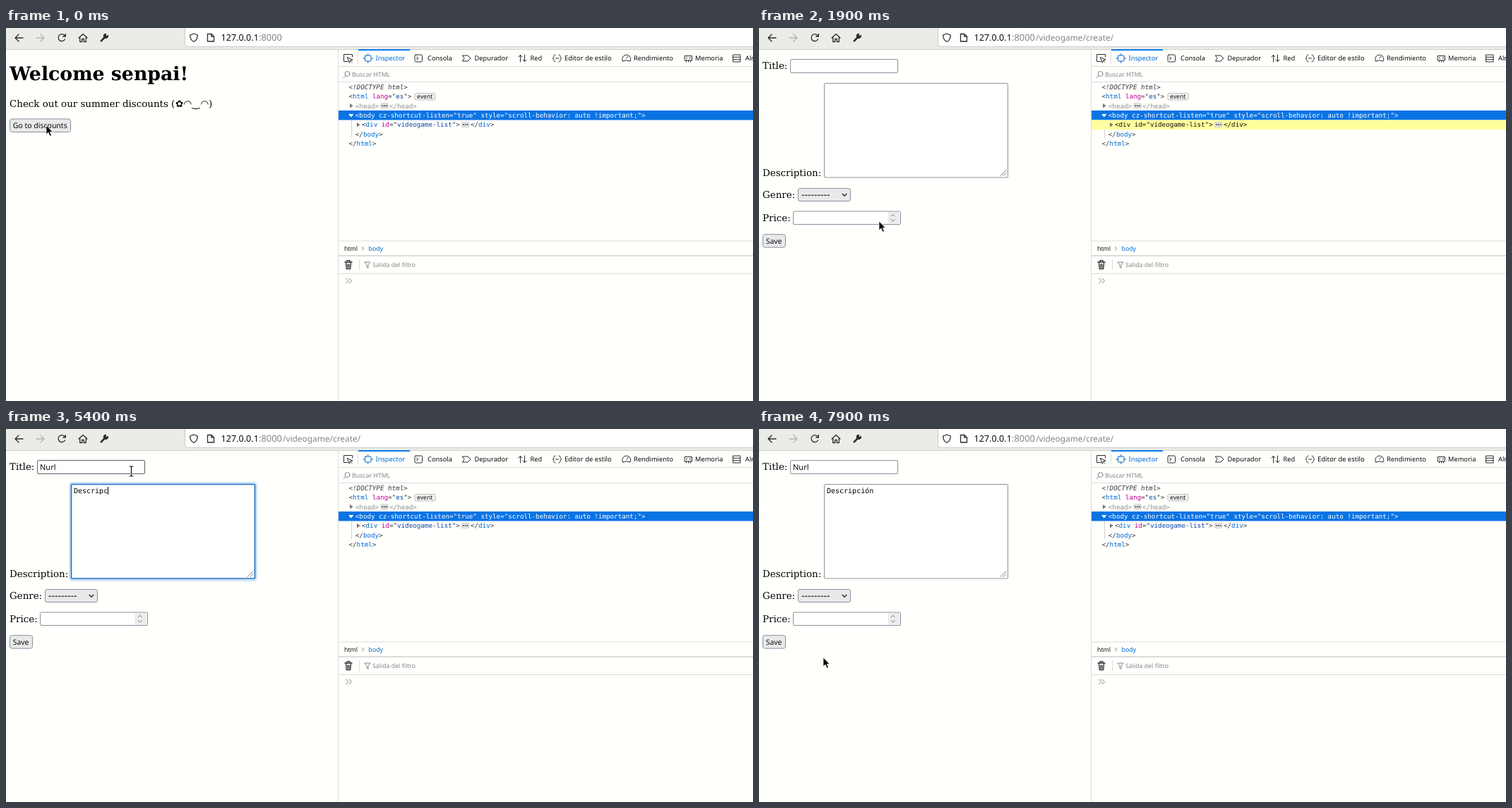
Animation of 1058x529 px, one loop 8000 ms. Source, as an HTML page:

```html
<!DOCTYPE html>
<html lang="en">
<head>
<meta charset="utf-8">
<title>Videogame form</title>
<style>
html, body { margin: 0; width: 100%; height: 100%; overflow: hidden; background: #fffffc; }
svg { display: block; width: 1058px; height: 529px; }
text { white-space: pre; text-rendering: geometricPrecision; }
.serif { font: 13.42px "DejaVu Serif", "DejaVu Sans", serif; fill: #000; }
.h1 { font-size: 26.75px; font-weight: bold; }
.h2 { font-size: 20.1px; font-weight: bold; }
.sans { font-family: "Noto Sans", "Open Sans", sans-serif; fill: #0c0c0d; }
.mono { font: 9.225px "DejaVu Sans Mono", monospace; fill: #38383d; }
.area { font-size: 10px; fill: #000; }
.tag { fill: #0069d2; }
.attr { fill: #c4009a; }
.val { fill: #0b46a8; }
.dim, .dim .tag { fill: #8b8f94; }
.tab { font-size: 9.3px; }
.small { font-size: 8.75px; }
.grey { fill: #85858a; }
.blue { fill: #0069d2; }
.line { stroke: #dcdcdc; }
.ico { fill: none; stroke: #2a2a2e; stroke-width: 1.3; stroke-linecap: round; stroke-linejoin: round; }
.thin { stroke-width: 1; }
.btn { fill: #e9e9ec; stroke: #8f8f9b; }
.btn.hover { fill: #d0d0d6; stroke: #62626d; }
.btn.active { fill: #b1b1b9; stroke: #484851; }
.field { fill: #fffffd; stroke: #8f8f9b; }
.field.hover { stroke: #5c5c66; }
.field.focus { stroke: #1c6fc4; stroke-width: 1.6; }
.glow { fill: none; stroke: #cfe4f8; stroke-width: 3; }
.caret { stroke: #000; stroke-width: 1; }
.off { display: none; }
</style>
</head>
<body>
<svg viewBox="0 0 1058 529">
  <rect width="1058" height="529" fill="#fffffc"/>

  <!-- browser toolbar -->
  <rect width="1058" height="30" fill="#ebebe8"/>
  <path class="line" d="M0 30.5H1058" style="stroke:#cfcfcd"/>
  <path d="M1059 -2H253.5V22.500Q253.500 26.500 257.500 26.500H1059Z" fill="#fffffd" stroke="#cbcbca"/>
  <g class="ico">
    <path d="M24 14H13M18 9L13 14L18 19"/>
    <path d="M43 14H54M49 9L54 14L49 19" stroke="#b3b3b1"/>
    <path d="M83.500 16A5 5 0 1 1 82.500 10L84 11.500M84.300 8.500V12H80.800"/>
    <path d="M103 14L109 8.500L115 14M104.700 13V19.500H107.700V15.500H110.300V19.500H113.300V13"/>
    <path d="M134.800 18.300L139.500 13.500" stroke-width="2.600"/>
    <path d="M144.300 10.500A3 3 0 1 1 141.500 8.300L140.800 11L142.200 12Z" fill="#2a2a2e"/>
    <path d="M266 8L271.300 10Q271.300 17 266 19.500Q260.700 17 260.700 10Z"/>
    <path d="M285.500 8.500H291L294.500 12V19H285.500ZM290.800 8.800V12.200H294.300"/>
  </g>
  <g class="sans">
    <text x="304.500" y="17.700" font-size="12.600">127.0.0.1</text>
    <text x="358" y="17.700" font-size="12.900" class="grey">:8000</text>
    <text id="path" x="392" y="17.700" font-size="11.900" class="grey"></text>
  </g>

  <!-- developer tools -->
  <path class="line" d="M470.500 31V529M471 54.500H1058M471 76.500H1058M471 302H1058M471 348.500H1058M498.500 35V51"/>
  <path class="line" d="M471 323H1058" stroke-width="2"/>
  <path class="line" d="M500.500 328V343"/>
  <rect x="499" y="30" width="73" height="2" fill="#0a7be6"/>
  <g class="ico thin">
    <path d="M484 47.500H478.500V37.500H490.500V41M483.500 41.500L491 45L487.700 46L486.500 49Z"/>
    <path d="M487.500 46L490 48.500"/>
    <g stroke="#0a66d0"><rect x="508.500" y="39" width="8.500" height="8" rx="1"/>
      <path d="M506 43H508M517.500 43H519.500M512.700 36.500V38.500M512.700 47.500V49.500"/></g>
    <rect x="579" y="38" width="10.500" height="10" rx="1.500"/>
    <path d="M581.500 41L584 43L581.500 45"/>
    <path d="M646.500 39H654L658 43L654 47H646.500L649 43Z"/>
    <path d="M728.500 48V38.500M726 41L728.500 38.500L731 41M734.500 38V47.500M732 45L734.500 47.500L737 45"/>
    <path d="M778 38C774.500 38 777 42.500 774 43C777 43.500 774.500 48 778 48M783 38C786.500 38 784 42.500 787 43C784 43.500 786.500 48 783 48M778.500 43H782.500"/>
    <path d="M873.500 47A6 6 0 1 1 884 47Q878.700 44.500 873.500 47M878.700 43L881.500 40"/>
    <path d="M961.500 39.500H971.500V46H961.500ZM963.500 46V48M966.500 46V48M969.500 46V48M964 41.500V43.500M969 41.500V43.500"/>
    <path d="M1030 38H1040V48H1030ZM1030 41.300H1040M1030 44.700H1040"/>
    <g stroke="#85858a"><circle cx="483.500" cy="65" r="3.500"/><path d="M481 67.800L478 70.500"/>
      <path d="M508 332H516L513 336V340.500L511 339V336Z"/>
      <path d="M481.500 355L485 358.500L481.500 362M486 355L489.500 358.500L486 362"/></g>
    <path d="M481.500 333.500L482.300 341.500H487.700L488.500 333.500M480 332H490M483 331.500V329.700H487V331.500M484 335V339.500M486 335V339.500" stroke-width="1.300"/>
    <path d="M504.500 310.500L506.700 312.700L504.500 315" stroke="#77777b"/>
  </g>
  <g class="sans tab">
    <text x="523.500" y="46.300" class="blue">Inspector</text>
    <text x="597" y="46.300">Consola</text>
    <text x="663.500" y="46.300">Depurador</text>
    <text x="742.500" y="46.300">Red</text>
    <text x="791" y="46.300" font-size="9.500">Editor de estilo</text>
    <text x="889" y="46.300">Rendimiento</text>
    <text x="976" y="46.300">Memoria</text>
    <text x="1047" y="46.300">Almacenamiento</text>
  </g>
  <g class="sans small">
    <text x="490" y="69" class="grey">Buscar HTML</text>
    <text x="479" y="316">html</text>
    <text x="513.500" y="316" class="blue">body</text>
    <text x="519" y="339" class="grey">Salida del filtro</text>
  </g>
  <rect x="471" y="117" width="587" height="13.500" fill="#0a74e4"/>
  <path class="line" d="M489.500 131V156" style="stroke:#cfcfcf"/>
  <g class="mono">
    <text x="485.500" y="86.700" font-style="italic">&lt;!DOCTYPE html&gt;</text>
    <text x="485.500" y="100.100">&lt;<tspan class="tag">html</tspan> <tspan class="attr">lang</tspan>="<tspan class="val">es</tspan>"&gt;</text>
    <text x="494.800" y="113.500" class="dim">&lt;<tspan class="tag">head</tspan>&gt;</text>
    <text x="543" y="113.500" class="dim">&lt;/<tspan class="tag">head</tspan>&gt;</text>
    <text x="494.800" y="126.900" style="fill:#fff">&lt;body cz-shortcut-listen="true" style="scroll-behavior: auto !important;"&gt;</text>
    <text x="504" y="140.300">&lt;<tspan class="tag">div</tspan> <tspan class="attr">id</tspan>="<tspan class="val">videogame-list</tspan>"&gt;</text>
    <text x="658" y="140.300">&lt;/<tspan class="tag">div</tspan>&gt;</text>
    <text x="494.800" y="153.700">&lt;/<tspan class="tag">body</tspan>&gt;</text>
    <text x="485.500" y="167.100">&lt;/<tspan class="tag">html</tspan>&gt;</text>
  </g>
  <g id="flash">
    <rect x="471" y="130.500" width="587" height="13.500" fill="#ffff9c"/>
    <g class="mono" style="fill:#111">
      <text x="504" y="140.300">&lt;div id="videogame-list"&gt;</text>
      <text x="658" y="140.300">&lt;/div&gt;</text>
    </g>
  </g>
  <path d="M487 107L491.500 110.300L487 113.500ZM497 134L501.500 137.300L497 140.500Z" fill="#77777b"/>
  <path d="M485 122H492.500L488.700 126.500Z" fill="#fff"/>
  <rect x="579" y="92.500" width="29" height="9.500" rx="2" fill="#f3f3f3" stroke="#bdbdbd"/>
  <text class="sans" x="582" y="100" font-size="8.600">event</text>
  <g fill="#e2e2e2" stroke="#c6c6c6" stroke-width=".6">
    <rect x="530.500" y="106.500" width="11" height="7.500" rx="2"/>
    <rect x="645" y="133.300" width="11" height="7.500" rx="2"/>
  </g>
  <path d="M532.500 110.300H540M647 137H654.500" stroke="#333" stroke-width="1.700" stroke-dasharray="1.700 1.200"/>

  <g id="home"></g>
  <g id="list"></g>

  <!-- form page -->
  <g id="form">
    <g class="serif">
      <text x="5" y="58">Title:</text>
      <text x="5" y="210">Description:</text>
      <text x="5" y="241">Genre:</text>
      <text x="5" y="273.500">Price:</text>
    </g>
    <rect id="titleGlow" class="glow" x="42.500" y="42.500" width="156" height="23" rx="3.500"/>
    <rect id="titleBox" class="field" x="44.500" y="44.500" width="152" height="19" rx="1.500"/>
    <text id="titleText" class="sans" x="48" y="58" font-size="11"></text>
    <rect id="areaGlow" class="glow" x="90.500" y="76.500" width="264" height="138" rx="3"/>
    <rect id="areaBox" class="field" x="92.500" y="78.500" width="260" height="133.500" rx="1"/>
    <text id="areaText" class="mono area" x="96" y="90.700"></text>
    <path class="ico thin" d="M342 209.500L350 201.500M346 209.500L350 205.500" style="stroke:#77777b"/>
    <path id="caret" class="caret"/>
    <rect id="select" class="btn" x="55.500" y="227.500" width="74" height="18" rx="2.500"/>
    <text class="sans" x="60" y="241" font-size="14">---------</text>
    <path class="ico" d="M118 235.200L121 238.200L124 235.200"/>
    <rect class="field" x="48.500" y="260" width="152" height="18.500" rx="1.500"/>
    <rect x="182.500" y="261" width="17" height="16.500" fill="#ececee"/>
    <path class="ico thin" d="M187 267L189.700 264.300L192.400 267M187 271.500L189.700 274.200L192.400 271.500" style="stroke:#77777b"/>
    <g id="save"></g>
    <g id="hints" class="sans" font-size="11.100">
      <rect id="hintBox" x="44.500" y="64.500" width="151.500" fill="#fffffd" stroke="#a9b0a4"/>
      <text x="50.500" y="77.700">Nurl</text>
      <text x="50.500" y="94.500">Nurl Ombrata</text>
      <text x="50.500" y="111.300">Nuestra prueba</text>
    </g>
    <g id="menu" class="sans" font-size="10.200">
      <rect x="56" y="248" width="82" height="92" fill="#000" opacity=".08"/>
      <rect x="55.500" y="246.500" width="81" height="92" fill="#fffffd" stroke="#999"/>
      <rect id="pick" x="56" width="80" height="22.500" fill="#4a90d0"/>
      <text x="65.500" y="263" font-size="13.700">---------</text>
      <text x="65.500" y="285">Horror</text>
      <text x="65.500" y="307.500">RPG</text>
      <text x="65.500" y="330">Adventure</text>
    </g>
  </g>

  <path id="arrow" d="M0 0V12.800L3 10.200L5.200 15.300L7.400 14.300L5.300 9.400H9Z" fill="#0a0a0a" stroke="#fff" stroke-width=".7"/>
  <g id="beam" fill="none">
    <path d="M-3 -7H-1L0 -6L1 -7H3M0 -6V6M-3 7H-1L0 6L1 7H3" stroke="#fff" stroke-width="2.400"/>
    <path d="M-3 -7H-1L0 -6L1 -7H3M0 -6V6M-3 7H-1L0 6L1 7H3" stroke="#111" stroke-width="1.200"/>
  </g>
</svg>
<script>
const $ = id => document.getElementById(id);
const LOOP = 8000, STEP = 100;

const text = (x, y, s, cls = '') => `<text class="serif ${cls}" x="${x}" y="${y}">${s}</text>`;
const button = (x, y, w, label, size, id = '') =>
  `<rect ${id && `id="${id}"`} class="btn" x="${x + .5}" y="${y}" width="${w}" height="18.5" rx="3"/>` +
  `<text class="sans" x="${x + 4.7}" y="${y + 13.2}" font-size="${size}">${label}</text>`;

$('home').innerHTML = text(5, 73.5, 'Welcome senpai!', 'h1') +
  text(5, 111.7, 'Check out our summer discounts (<tspan x="240">✿</tspan><tspan x="251.5">◠</tspan>' +
    '<tspan x="263.5">‿</tspan><tspan x="275.5">◠</tspan><tspan x="287">)</tspan>') +
  button(5, 129, 86, 'Go to discounts', 10.5, 'go');

const games = [
  ['Warren of Sorrel', 'Experience the quiet terror of this 1-bit love letter to Tenjo Iri and', 'R.T. Gravemoor. …'],
  ['Acolyte Organizer', 'Seize forbidden treasures. Summon alien gods. Feed on your', 'disciples. Acolyte Organizer is a game …'],
  ['Hemlocke Directorate', 'A roguelite monster-management simulation inspired by the likes', 'of the QVD Institution, Attic by the …'],
  ['Nurl', 'Descripción']
];
$('list').innerHTML = games.map(([name, ...lines], i) => {
  const y = 67 + 122.5 * i;
  return text(5, y, name, 'h2') +
    lines.map((s, n) => text(5, y + 34.9 + 16.2 * n, s)).join('') +
    button(5, y + 51.6 + 16.2 * (lines.length - 1), 62, 'Read more', 10.25);
}).join('') + button(72, 486.1, 108, 'Submit a videogame', 10.2, 'submit');
$('save').innerHTML = button(5, 292.7, 32, 'Save', 10.4);

// each track is a list of [start time, value...]
const pages = [[0, 'home'], [600, 'list'], [1800, 'form']];
const paths = { home: '', list: '/videogame/list/', form: '/videogame/create/' };
const goState = [[0, ''], [100, 'hover'], [500, 'active']];
const submitState = [[0, ''], [1100, 'hover'], [1700, 'active']];
const titleKeys = [[0, 0], [3500, 1], [3900, 2], [4000, 3], [4100, 4]];
const areaKeys = [[0, 0], [4500, 1], [4600, 2], [4800, 3], [5000, 4], [5100, 6], [5300, 7], [5400, 8], [5900, 9], [6000, 11]];
const hintCount = [[0, 0], [3900, 3], [4000, 2], [4500, 0]];
const menuItem = [[0, -1], [7200, 0], [7400, 1], [7500, 2], [7600, 3], [7900, -1]];
const pointer = [
  [0, 57, 138], [600, 104, 156], [900, 337, 303], [1100, 142, 490], [1200, 150, 507],
  [1800, 160, 390], [1900, 170, 274], [2000, 172, 230],
  [2100, 176, 190, 1], [2200, 177, 155, 1], [2300, 177, 122, 1], [2400, 177, 95, 1], [2500, 177, 76, 1],
  [2600, 177, 71, 1], [2700, 177, 66, 1], [2800, 177, 63, 1], [3000, 177.5, 60, 1],
  [3900, 171, 52], [4100, 177.5, 60, 1],
  [6600, 165, 100, 1], [6700, 140, 150, 1], [6800, 112, 195, 1],
  [6900, 92, 229], [7200, 90, 251], [7400, 89, 281], [7500, 90, 303], [7600, 91, 324]
];

const at = (track, t) => track.findLast(e => e[0] <= t);
const val = (track, t) => at(track, t)[1];
const show = (id, on) => $(id).classList.toggle('off', !on);
const put = (id, s) => { if ($(id).textContent !== s) $(id).textContent = s; };
const within = (t, a, b) => t >= a && t < b;

function render(t) {
  const page = val(pages, t);
  for (const id in paths) show(id, id === page);
  put('path', paths[page]);
  $('go').setAttribute('class', 'btn ' + val(goState, t));
  $('submit').setAttribute('class', 'btn ' + val(submitState, t));
  $('flash').setAttribute('opacity', page === 'form' ? Math.max(0, Math.min(1, (2500 - t) / 600)) : 0);

  const inTitle = within(t, 2800, 4100), inArea = within(t, 4100, 7100);
  $('titleBox').setAttribute('class', 'field ' + (inTitle ? 'focus' : within(t, 2600, 6600) ? 'hover' : ''));
  $('areaBox').setAttribute('class', 'field ' + (inArea ? 'focus' : ''));
  show('titleGlow', inTitle);
  show('areaGlow', inArea);
  put('titleText', 'Nurl'.slice(0, val(titleKeys, t)));
  put('areaText', 'Descripción'.slice(0, val(areaKeys, t)));

  show('caret', inTitle || inArea);
  if (inTitle || inArea) {
    const [x, id, y] = inTitle ? [48, 'titleText', 48] : [96, 'areaText', 82];
    const end = Math.floor(x + $(id).getComputedTextLength()) + .5;
    $('caret').setAttribute('d', `M${end} ${y}v${inTitle ? 13 : 11}`);
  }

  const hints = val(hintCount, t);
  show('hints', hints);
  $('hintBox').setAttribute('height', 2.1 + 16.8 * hints);
  $('hints').querySelectorAll('text').forEach((e, i) => e.classList.toggle('off', i >= hints));

  const item = val(menuItem, t);
  show('menu', item >= 0);
  $('pick').setAttribute('y', 247 + 22.6 * item);
  $('menu').querySelectorAll('text').forEach((e, i) => e.style.fill = i === item ? '#fff' : '');
  $('select').setAttribute('class', 'btn ' + (within(t, 6900, 7900) ? 'hover' : ''));

  const [, x, y, beam] = at(pointer, t);
  show('arrow', !beam);
  show('beam', beam);
  $(beam ? 'beam' : 'arrow').setAttribute('transform', `translate(${x} ${y})`);
}

const start = performance.now();
function tick() {
  const t = (performance.now() - start) % LOOP;
  render(Math.floor(t / STEP) * STEP);
  requestAnimationFrame(tick);
}
tick();
</script>
</body>
</html>
```
